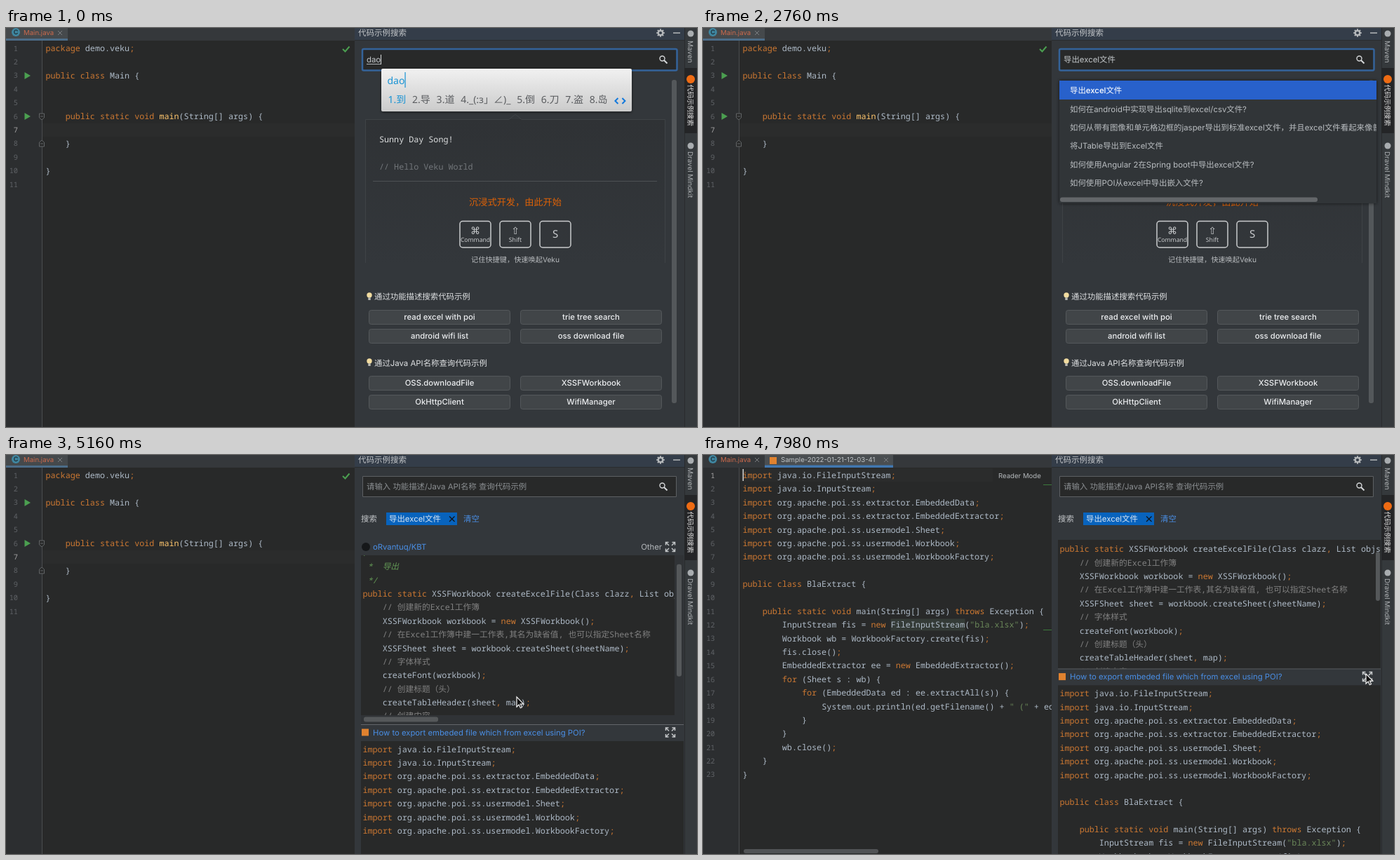
An HTML page with a canvas that plays this animation: 985 px wide and 569 px high, repeating every 8000 ms.

```html
<!DOCTYPE html>
<html lang="zh-CN">
<head>
<meta charset="utf-8">
<title>Code sample search</title>
<style>
html, body { margin: 0; width: 100%; height: 100%; overflow: hidden; background: #282828; }
canvas { display: block; }
</style>
</head>
<body>
<canvas id="stage" width="985" height="569"></canvas>
<script>
const ctx = document.getElementById('stage').getContext('2d');
const LOOP = 8000, STEP = 60;
const CW = 7.04, LH = 19.39;
const CJK = '"Noto Sans CJK SC", "Noto Sans CJK", sans-serif';
const UI = 'Inter, ' + CJK;
const MONO = '"Noto Sans Mono", "Noto Sans CJK SC", "Noto Sans CJK", monospace';
const IME = '"Noto Sans", ' + CJK;
const BASE = '#aebac7', ORANGE = '#cc7832', EDIT = '#282929', PANEL = '#33373b', LINK = '#4a8fe6';
const THUMB = '#55585a';
const KEYWORDS = new Set('package import public static class void new return for throws'.split(' '));

const MAIN = ['package demo.veku;', '', 'public class Main {', '', '',
  '    public static void main(String[] args) {', '', '    }', '', '}', ''];

const EXPORT = ['/**', ' *  导出', ' */',
  'public static XSSFWorkbook createExcelFile(Class clazz, List objs, Map map) {',
  '    // 创建新的Excel工作簿',
  '    XSSFWorkbook workbook = new XSSFWorkbook();',
  '    // 在Excel工作簿中建一工作表,其名为缺省值, 也可以指定Sheet名称',
  '    XSSFSheet sheet = workbook.createSheet(sheetName);',
  '    // 字体样式',
  '    createFont(workbook);',
  '    // 创建标题（头）',
  '    createTableHeader(sheet, map);',
  '    // 创建内容',
  '    createTableRows(sheet, map, objs, clazz);',
  '    return workbook;', '}'];

const SAMPLE = ['import java.io.FileInputStream;', 'import java.io.InputStream;',
  ...['extractor.EmbeddedData', 'extractor.EmbeddedExtractor', 'usermodel.Sheet',
    'usermodel.Workbook', 'usermodel.WorkbookFactory'].map(s => `import org.apache.poi.ss.${s};`),
  '', 'public class BlaExtract {', '',
  '    public static void main(String[] args) throws Exception {',
  '        InputStream fis = new FileInputStream("bla.xlsx");',
  '        Workbook wb = WorkbookFactory.create(fis);',
  '        fis.close();',
  '        EmbeddedExtractor ee = new EmbeddedExtractor();',
  '        for (Sheet s : wb) {',
  '            for (EmbeddedData ed : ee.extractAll(s)) {',
  '                System.out.println(ed.getFilename() + " (" + ed.getContentType());',
  '            }', '        }', '        wb.close();', '    }', '}'];

const HINTS = ['导出excel文件', '如何在android中实现导出sqlite到excel/csv文件?',
  '如何从带有图像和单元格边框的jasper导出到标准excel文件，并且excel文件看起来像普通文件?',
  '将JTable导出到Excel文件', '如何使用Angular 2在Spring boot中导出excel文件?',
  '如何使用POI从excel中导出嵌入文件?'];

// Input method: start time, committed text, composition, candidates
const DAO = '到 导 道 _(:з」∠)_ 倒 刀 盗 岛';
const CHU = '导出 到处 倒出 道出 到 导 道';
const EX = 'excel 额 呃 恶 饿 鹅 俄';
const WEN = '问 文 闻 稳 温 吻 纹 蚊';
const WENJ = '文件 # 问卷 问价 问及 文集 问句 文具';
const TYPING = [
  [0, '', 'dao', DAO], [120, '', "dao'c", '到场 到此 导出 到处 倒车 刀叉 到'],
  [240, '', "dao'ch", CHU], [360, '', "dao'chu", CHU], [720, '导出', ''],
  [960, '导出', 'e', '额 呃 恶 饿 鹅 俄 扼 鄂'], [1080, '导出', 'ex', EX], [1200, '导出', 'exc', EX],
  [1320, '导出', 'exce', EX], [1380, '导出', 'excel', EX], [1560, '导出excel', ''],
  [1680, '导出excel', 'w', '我 无 为 问 位 五 玩 万'], [1740, '导出excel', 'we', '为 我 位 未 喂 微 维 围'],
  [1860, '导出excel', 'wen', WEN], [1980, '导出excel', "wen'j", WENJ],
  [2160, '导出excel', "wen'ji", WENJ], [2220, '导出excel', "wen'jia", WENJ],
  [2340, '导出excel', "wen'jian", '文件 稳健 问 文 闻 稳 温'], [2460, '导出excel文件', '']];

const LIST_AT = 2640, RESULT_AT = 3420, HOVER1 = 4920, HOVER1_END = 6240;
const HOVER2 = 6660, HOVER2_END = 7140, OPEN_AT = 7620, CURSOR_AT = 4560;
const SCROLL = [[4980, 0], [5640, 85.5], [5940, 85.5], [6240, 0]];
const PAGE = [[6240, 0], [6720, 79.4]];
const MOUSE_X = [[4560, 742], [4920, 728], [5520, 728], [5760, 738], [6240, 738], [6780, 881], [7080, 881], [7440, 945]];
const MOUSE_Y = [[4560, 460], [4920, 345], [5520, 345], [5760, 307], [6240, 307], [6780, 345], [7080, 345], [7440, 312]];

function track(keys, t) {
  if (t <= keys[0][0]) return keys[0][1];
  for (let i = 1; i < keys.length; i++) {
    const [a, u] = keys[i - 1], [b, v] = keys[i];
    if (t < b) {
      const k = (t - a) / (b - a);
      return u + (v - u) * k * k * (3 - 2 * k);
    }
  }
  return keys[keys.length - 1][1];
}

function rect(x, y, w, h, fill) {
  ctx.fillStyle = fill;
  ctx.fillRect(x, y, w, h);
}

function round(x, y, w, h, r, fill, stroke, width = 1) {
  ctx.beginPath();
  ctx.roundRect(x, y, w, h, r);
  if (fill) { ctx.fillStyle = fill; ctx.fill(); }
  if (stroke) { ctx.strokeStyle = stroke; ctx.lineWidth = width; ctx.stroke(); }
}

function dot(x, y, r, fill) {
  ctx.beginPath();
  ctx.arc(x, y, r, 0, 7);
  ctx.fillStyle = fill;
  ctx.fill();
}

function path(points, stroke, width = 1, fill) {
  ctx.beginPath();
  points.forEach(([x, y], i) => i ? ctx.lineTo(x, y) : ctx.moveTo(x, y));
  if (fill) { ctx.closePath(); ctx.fillStyle = fill; ctx.fill(); }
  if (stroke) { ctx.strokeStyle = stroke; ctx.lineWidth = width; ctx.stroke(); }
}

// y is the middle of the line
function text(s, x, y, color, size = 11.4, align = 'left', family = UI, weight = 400) {
  ctx.font = `${weight} ${size}px ${family}`;
  ctx.textAlign = align;
  ctx.fillStyle = color;
  ctx.fillText(s, x, y + size * 0.36);
  return ctx.measureText(s).width;
}

function clipped(x, y, w, h, draw) {
  ctx.save();
  ctx.beginPath();
  ctx.rect(x, y, w, h);
  ctx.clip();
  draw();
  ctx.restore();
}

function tokenColor(s, named) {
  if (s.startsWith('//')) return '#808080';
  if (/^\s*\/?\*/.test(s)) return '#629755';
  if (s[0] === '"') return '#6a8759';
  if (KEYWORDS.has(s) || s === ';' || s === ',') return ORANGE;
  return named && s === 'main' ? '#ffc66d' : BASE;
}

function code(lines, x, y, named) {
  ctx.textAlign = 'left';
  lines.forEach((line, row) => {
    for (const m of line.matchAll(/\/\/.*|^\s*\/?\*.*|"[^"]*"|[\w.]+|\s+|./g)) {
      if (!m[0].trim()) continue;
      const color = tokenColor(m[0], named);
      const style = color === '#629755' ? 'italic 400' : color === '#808080' ? '400' : '500';
      ctx.fillStyle = color;
      ctx.font = `${style} 11.73px ${MONO}`;
      ctx.fillText(m[0], x + m.index * CW, y + row * LH + 4);
    }
  });
}

function tabClose(x) {
  path([[x - 3, 4], [x + 3, 10]], '#7a7d80');
  path([[x + 3, 4], [x - 3, 10]], '#7a7d80');
}

function editor(open) {
  rect(0, 0, 497, 569, EDIT);
  rect(0, 18, 51, 551, '#2c2e30');
  rect(0, 0, 497, 18, '#35383b');
  rect(0, 0, 88, 18, open ? '#35383b' : '#45494c');
  if (!open) rect(0, 15, 88, 3, '#4c6c88');
  dot(14, 6, 6, '#3f86a0');
  text('C', 14, 6, '#1e2d35', 9, 'center', UI, 600);
  text('Main.java', 25, 7, '#cc6a4c', 9.6);
  tabClose(77);
  if (open) {
    rect(88, 0, 183, 18, '#4a4e51');
    rect(88, 14.5, 183, 3.5, '#4177b0');
    rect(95, 3, 10, 10, '#e0822f');
    text('Sample-2022-01-21-12-03-41', 111, 7, '#bfc3c6', 9.6);
    tabClose(261);
  }
  const current = open ? 0 : 6, count = open ? 23 : 11;
  rect(52, Math.round(29 + current * LH - 9.7), 445, 19, '#2b2c2c');
  for (let i = 0; i < count; i++)
    text(i + 1, 17, 29 + i * LH, i === current ? '#a4a3a3' : '#5f6266', 10.3, 'right', MONO);
  rect(51, 18, 1, 551, '#4a4c4e');
  if (open) {
    rect(267.5, 233.5, 106, 17, '#343b37');
    clipped(52, 18, 445, 551, () => code(SAMPLE, 56.5, 29));
    rect(56.5, 20, 1.5, 17, '#d0d0d0');
    rect(413, 19, 84, 21, EDIT);
    text('Reader Mode', 421, 30, '#b4b8bb', 9.6);
    rect(485, 42, 12, 1, '#3c7a3c');
    rect(485, 249, 12, 1, '#3c7a3c');
    round(58, 562, 192, 6, 3, '#515355');
    return;
  }
  code(MAIN, 56.5, 29, true);
  for (const y of [68, 126]) path([[26.5, y - 5], [35, y], [26.5, y + 5]], null, 1, '#4b9f50');
  path([[47.5, 122], [54.5, 122], [54.5, 128], [51, 131], [47.5, 128], [47.5, 122]], '#626567', 1, EDIT);
  path([[47.5, 169], [54.5, 169], [54.5, 163], [51, 160], [47.5, 163], [47.5, 169]], '#626567', 1, EDIT);
  for (const y of [126, 165]) path([[49, y], [53, y]], '#626567');
  path([[480, 30], [483.5, 33.5], [489.5, 26.5]], '#4b9f50', 2);
}

function vertical(s, y, color, size, weight) {
  ctx.save();
  ctx.translate(976, y);
  ctx.rotate(Math.PI / 2);
  text(s, 0, 0, color, size, 'left', UI, weight);
  ctx.restore();
}

function frame() {
  rect(497, 0, 488, 569, PANEL);
  rect(497, 0, 470, 17, '#343d49');
  rect(497, 17, 470, 1, '#2a2c2e');
  text('代码示例搜索', 502, 7, '#c2c5c8', 11.5);
  for (let i = 0; i < 8; i++) {
    const a = i * Math.PI / 4, c = Math.cos(a), s = Math.sin(a);
    path([[933 + 3 * c, 7 + 3 * s], [933 + 5.7 * c, 7 + 5.7 * s]], '#b5b8ba', 2.2);
  }
  ctx.beginPath();
  ctx.arc(933, 7, 3.2, 0, 7);
  ctx.lineWidth = 2.2;
  ctx.stroke();
  rect(951, 6.3, 10, 1.5, '#b5b8ba');
  rect(967, 0, 18, 569, '#35393c');
  rect(967, 0, 1, 569, '#292b2d');
  rect(967, 57, 18, 93, '#242527');
  dot(976, 8, 4.5, '#a9adb0');
  vertical('Maven', 18, '#adb0b3', 10);
  dot(976, 73, 6, '#ee6b13');
  vertical('代码示例搜索', 80.5, '#e4e4e4', 9.9, 500);
  dot(976, 168, 4.5, '#a9adb0');
  vertical('Dravel Mindkit', 176, '#adb0b3', 9.8);
}

function bulb(y) {
  dot(518, y - 2, 3.7, '#f2dca0');
  rect(516.3, y + 1.5, 3.4, 3.5, '#b9b9b4');
}

function button(label, x, y) {
  round(x + .5, y + .5, 201, 20, 3, '#414548', '#54585b');
  text(label, x + 101, y + 10.4, '#eceef0', 11.3, 'center', UI, 500);
}

function keycap(x, symbol, label) {
  round(x, 275.5, 44, 37.5, 4, null, '#c9cbcd', 1.5);
  if (!label) return text(symbol, x + 22, 294, '#c9cbcd', 15, 'center', IME);
  text(symbol, x + 22, 289, '#c9cbcd', 14, 'center', '"DejaVu Sans", sans-serif');
  text(label, x + 22, 301.5, '#c9cbcd', 8.6, 'center', IME);
}

function home() {
  const g = ctx.createLinearGradient(0, 130, 0, 338);
  g.addColorStop(0, '#2f3235');
  g.addColorStop(1, PANEL);
  rect(513, 130, 427, 208, g);
  path([[512.5, 335], [512.5, 130.5], [717, 130.5], [726, 123], [735, 130.5], [939.5, 130.5], [939.5, 335]], '#3f4346');
  text('Sunny Day Song!', 532, 159, '#dcdedf', 11.73, 'left', MONO, 500);
  text('// Hello Veku World', 532, 198, '#72767a', 11.73, 'left', MONO);
  rect(523, 218, 405, 1, '#4d5154');
  text('沉浸式开发，由此开始', 726, 248, '#de6207', 13.2, 'center');
  keycap(647, '⌘', 'Command');
  keycap(704, '⇧', 'Shift');
  keycap(761, 'S');
  text('记住快捷键，快速唤起Veku', 726, 330.5, '#b9bcbf', 10.2, 'center');
  bulb(383);
  text('通过功能描述搜索代码示例', 525, 383, '#dfe1e3');
  bulb(477);
  text('通过Java API名称查询代码示例', 525, 477.5, '#dfe1e3');
  ['read excel with poi', 'trie tree search', 'android wifi list', 'oss download file',
    'OSS.downloadFile', 'XSSFWorkbook', 'OkHttpClient', 'WifiManager'].forEach((label, i) =>
    button(label, 517 + i % 2 * 216, (i < 4 ? 402 : 442) + (i >> 1) * 27));
  round(949, 74, 7, 461, 3, '#54585b');
}

function searchBox(focus) {
  rect(508, 30, 448, 30, EDIT);
  if (focus) round(508, 30, 448.5, 30.5, 2, null, '#34639a', 2.5);
  else round(508.5, 30.5, 447, 29, 0, null, '#5d6063');
  ctx.beginPath();
  ctx.arc(935.5, 43.5, 3.5, 0, 7);
  ctx.strokeStyle = '#d4d6d8';
  ctx.lineWidth = 1.4;
  ctx.stroke();
  path([[938, 46], [942.5, 50.5]], '#d4d6d8', 2);
}

function candidates(comp, list, left) {
  const gap = 8.8, items = list.split(' ').map((s, i) => `${i + 1}.${s}`);
  ctx.font = `14px ${IME}`;
  const widths = items.map(s => s.endsWith('#') ? 30 : ctx.measureText(s).width);
  const width = Math.round(widths.reduce((a, w) => a + w + gap, 0) + 35);
  const g = ctx.createLinearGradient(0, 58, 0, 119);
  g.addColorStop(0, '#f1f1f1');
  g.addColorStop(1, '#cbcbcb');
  ctx.save();
  ctx.shadowColor = '#0008';
  ctx.shadowBlur = 4;
  ctx.shadowOffsetY = 1;
  round(left, 58, width, 61, 2, g);
  ctx.restore();
  const w = text(comp, left + 8.5, 75, '#1893d4', 14, 'left', IME);
  rect(left + 8.5 + w, 63, 1.2, 22, '#1893d4');
  let x = left + 9.5;
  items.forEach((s, i) => {
    const page = s.endsWith('#');
    text(page ? s.slice(0, -1) : s, x, 102, i ? '#5b5d60' : '#1893d4', 14, 'left', IME);
    if (page) {
      path([[x + 15, 95], [x + 27, 94], [x + 30, 107], [x + 13, 108]], null, 1, '#aeb2b4');
      for (let k = 0; k < 3; k++) path([[x + 17, 98 + k * 3], [x + 27, 97.5 + k * 3]], '#e7e9ea');
    }
    x += widths[i] + gap;
  });
  x += 1;
  path([[x + 5, 100], [x + 1, 104], [x + 5, 108]], '#1479dc', 2);
  path([[x + 11, 100], [x + 15, 104], [x + 11, 108]], '#1479dc', 2);
}

function typing(t) {
  const [, done, comp, list] = TYPING.filter(s => s[0] <= t).pop();
  const x = 514 + text(done, 514, 45, '#c3c7ca');
  const w = text(comp, x, 45, '#c3c7ca');
  if (t < 2460) rect(Math.round(x + w), 38, 1, 14, '#d8dadc');
  if (!comp) return;
  rect(x, 51, w, 1, '#b0b4b7');
  candidates(comp, list, Math.round(x + 21.4));
}

function hints() {
  ctx.save();
  ctx.shadowColor = '#0009';
  ctx.shadowBlur = 5;
  rect(508, 75, 452, 175, '#313538');
  ctx.restore();
  rect(508, 75, 452, 27, '#2861cb');
  clipped(508, 75, 452, 175, () => HINTS.forEach((s, i) =>
    text(s, 523, 89 + i * 26.4, i ? '#b9bdc0' : '#ffffff', 11.4, 'left', UI, i ? 400 : 500)));
  round(509, 241.5, 367, 6.5, 3, '#64676a');
}

function expandIcon(x, y) {
  for (const [a, b] of [[1, 1], [1, -1], [-1, 1], [-1, -1]]) {
    path([[x + 2 * a, y + 2 * b], [x + 6 * a, y + 6 * b]], '#c6c9cb', 1.5);
    path([[x + 2.5 * a, y + 6.5 * b], [x + 6.5 * a, y + 6.5 * b], [x + 6.5 * a, y + 2.5 * b]], '#c6c9cb', 1.5);
  }
}

// Code area; while hovered, scroll bars take its right and lower edge
function codeBox(lines, top, bottom, y, hover) {
  rect(506, top, 460, bottom - top, hover ? '#303336' : EDIT);
  const w = hover ? 447 : 460, h = bottom - top - (hover ? 13 : 0);
  rect(506, top, w, h, EDIT);
  clipped(506, top, w, h, () => code(lines, 508.5, y));
}

function results(t) {
  const scroll = track(SCROLL, t), page = track(PAGE, t);
  const hover1 = t >= HOVER1 && t < HOVER1_END, hover2 = t >= HOVER2 && t < HOVER2_END;
  text('请输入 功能描述/Java API名称 查询代码示例', 514, 45, '#8b8f92');
  text('搜索', 506, 91, '#c3c6c9');
  rect(542, 82, 101, 18, '#0863bd');
  text('导出excel文件', 546, 91, '#dbe6f2');
  path([[632, 87.5], [639.5, 95]], '#10151b', 1.3);
  path([[639.5, 87.5], [632, 95]], '#10151b', 1.3);
  text('清空', 652, 91, LINK);

  clipped(497, 121, 470, 448, () => {
    const top = 131 - page, mid = 395.5 - page;
    codeBox(EXPORT, top + 12, top + 253, 155.4 - page - scroll, hover1);
    dot(513, top, 6, '#16181a');
    text('oRvantuq/KBT', 523, top, LINK, 11.3);
    text('Other', 935, top, '#b5b9bc', 11.3, 'right');
    expandIcon(947, top);
    if (t >= HOVER1) {
      const y = 144 + 64 * scroll / 85.5 - page, end = y + 160 - 16.5 * page / 79.4;
      const from = Math.max(y, 138);
      round(hover1 ? 956 : 959, from, hover1 ? 7 : 6, end - from, 3, THUMB);
    }
    if (hover1) round(510, 373.5 - page, 106, 7, 3, THUMB);

    rect(506, mid - 11.5, 460, 1, '#63666a');
    rect(506, mid - 10.5, 460, 23, PANEL);
    rect(507, mid - 5, 10, 10, '#e0822f');
    text('How to export embeded file which from excel using POI?', 523, mid, LINK, 11.3);
    expandIcon(947, mid);
    codeBox(SAMPLE, mid + 12.5, 569, 419.6 - page, hover2);
    if (hover2) {
      round(956, 332, 7, 109, 3, THUMB);
      round(510, 558.5, 206, 7, 3, THUMB);
    }
  });
}

function pointer(x, y) {
  const shape = [[0, 0], [0, 14], [3.2, 11], [5.3, 15.8], [7.5, 14.8], [5.4, 10.2], [9.8, 10.2], [0, 0]];
  path(shape.map(([a, b]) => [x + a, y + b]), '#f2f2f2', 1.2, '#111111');
}

function draw(now) {
  const t = Math.floor(now % LOOP / STEP) * STEP;
  frame();
  editor(t >= OPEN_AT);
  const atHome = t < RESULT_AT;
  if (atHome) home();
  searchBox(atHome);
  if (atHome) {
    if (t >= LIST_AT) hints();
    typing(t);
  } else {
    results(t);
  }
  if (t >= CURSOR_AT) pointer(track(MOUSE_X, t), track(MOUSE_Y, t));
}

ctx.textRendering = 'geometricPrecision';
const start = performance.now();
function tick() {
  draw(performance.now() - start);
  requestAnimationFrame(tick);
}
tick();
</script>
</body>
</html>
```
